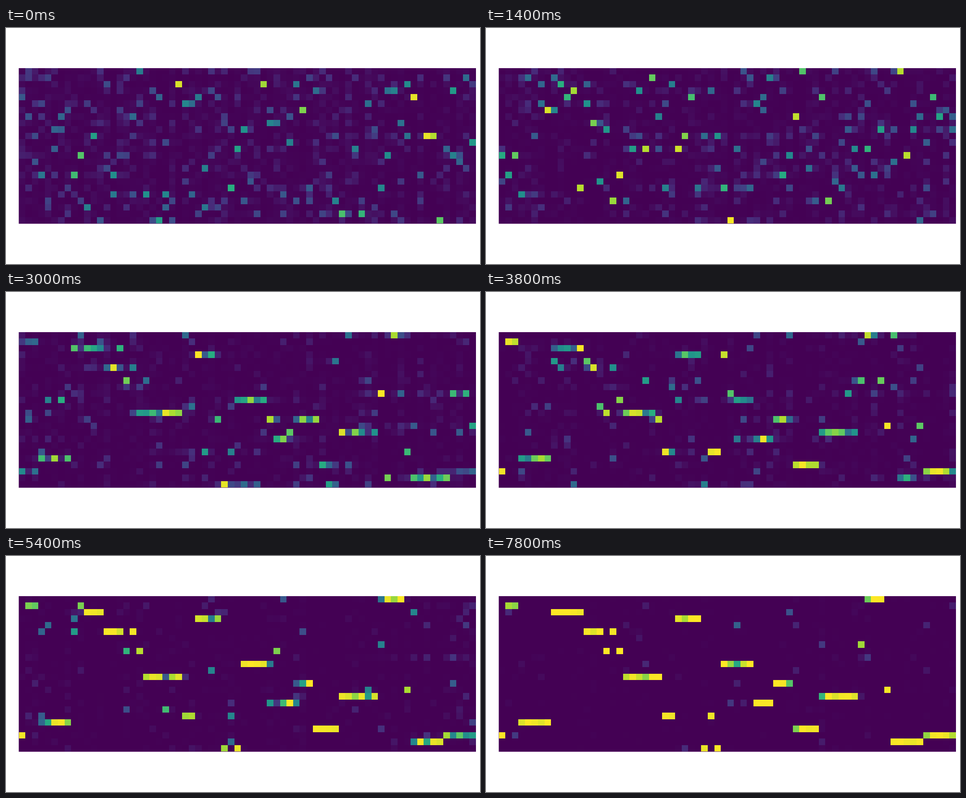
These frames come from a looping animation (1058x529 px, 8000 ms). An HTML page with a canvas:

```html
<!DOCTYPE html>
<html lang="en">
<head>
<meta charset="utf-8">
<title>Assignment heatmap</title>
<style>
  html, body { margin: 0; width: 100%; height: 100%; overflow: hidden; background: #fff; }
  canvas { display: block; }
</style>
</head>
<body>
<canvas id="stage" width="1058" height="529"></canvas>
<script>
const ctx = document.getElementById('stage').getContext('2d');
const COLS = 70, ROWS = 24, STEPS = 40, STEP_MS = 200;
const LEFT = 29.05, TOP = 90, CELL_W = 14.577, CELL_H = 14.53;
const TEMPERATURE = 0.75;

// Final rows from left to right, as "row" or "row x number of columns".
const runs = '21 1x2 19x5 2x5 5x3 8 5 8 12x6 18x2 3x4 23 18 23 10x5 16x3 13x3 20x4 15x6 7 0x3 14 22x5 21x5';

let column = 0;
const segments = runs.split(' ').map(run => {
  const [row, count = 1] = run.split('x').map(Number);
  const from = column;
  column += count;
  return { row, from, to: column - 1 };
});
const passing = { row: 9, from: 53, to: 69 }; // rises, then fades away

const viridis = ['#440154', '#472d7b', '#3b528b', '#2c728e', '#21918c',
  '#28ae80', '#5ec962', '#addc30', '#fde725']
  .map(hex => hex.match(/\w\w/g).map(part => parseInt(part, 16)));

function color(value) {
  const pos = Math.min(1, value) * (viridis.length - 1);
  const i = Math.min(viridis.length - 2, Math.floor(pos));
  const mix = viridis[i].map((v, n) => Math.round(v + (viridis[i + 1][n] - v) * (pos - i)));
  return `rgb(${mix})`;
}

function randomFrom(seed) {
  return () => {
    seed = (seed + 0x6D2B79F5) | 0;
    let t = Math.imul(seed ^ (seed >>> 15), 1 | seed);
    t ^= t + Math.imul(t ^ (t >>> 7), 61 | t);
    return ((t ^ (t >>> 14)) >>> 0) / 4294967296;
  };
}

// Runs keep gaining weight; the halo beside them peaks early and decays.
function scores(step) {
  const grid = Array.from({ length: COLS }, () => new Array(ROWS).fill(0));
  const settled = 9 * (1 - Math.exp(-step / 27));
  const u = step / 14;
  const halo = 2.6 * u * Math.exp(1 - u);
  const spread = ({ row, from, to }, inside) => {
    for (let c = 0; c < COLS; c++) {
      const gap = Math.max(from - c, c - to, 0);
      const score = gap ? halo * Math.exp(-gap / 4) : inside;
      grid[c][row] = Math.max(grid[c][row], score);
    }
  };
  segments.forEach(segment => spread(segment, settled));
  spread(passing, halo);
  return grid;
}

// Gumbel-softmax sample of every column.
function sample(step) {
  const random = randomFrom(step * 7919 + 17);
  const gumbel = () => -Math.log(Math.max(0.003, -Math.log(1 - random())));
  return scores(step).map(column => {
    const weights = column.map(s => Math.exp((s + gumbel()) / TEMPERATURE));
    const sum = weights.reduce((a, b) => a + b);
    return weights.map(w => w / sum);
  });
}

function draw(step) {
  const x = c => Math.floor(LEFT + c * CELL_W);
  const y = r => Math.floor(TOP + r * CELL_H);
  ctx.fillStyle = '#fff';
  ctx.fillRect(0, 0, 1058, 529);
  ctx.fillStyle = color(0);
  ctx.fillRect(28.5, TOP, 1020.5, ROWS * CELL_H);
  sample(step).forEach((column, c) => column.forEach((value, r) => {
    ctx.fillStyle = color(value);
    ctx.fillRect(x(c), y(r), x(c + 1) - x(c), y(r + 1) - y(r));
  }));
}

let shown = -1;
function tick(now) {
  const step = Math.floor(now / STEP_MS) % STEPS;
  if (step !== shown) draw(shown = step);
  requestAnimationFrame(tick);
}
tick(performance.now());
</script>
</body>
</html>
```
